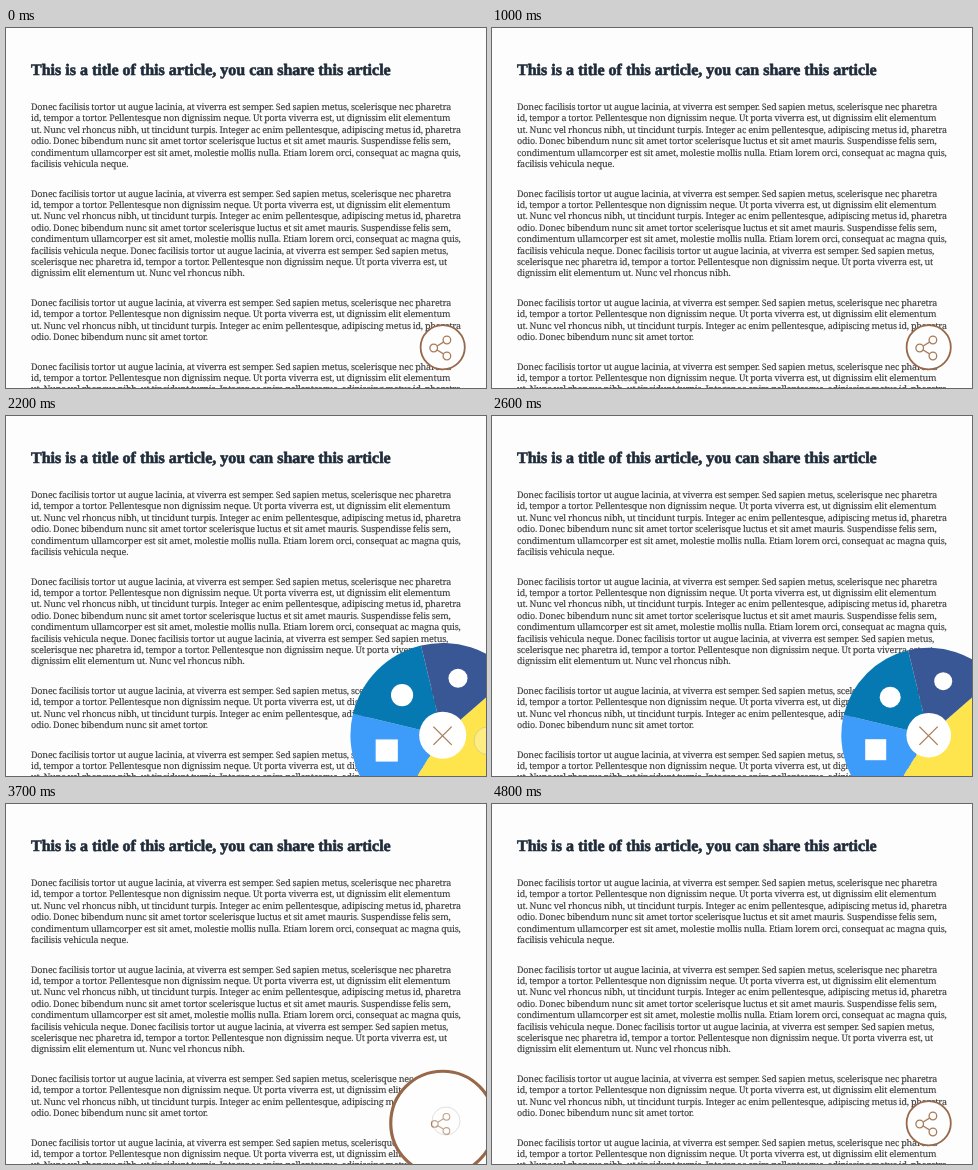
Recreate the animation shown at these times as an HTML page. Size 480 by 360 pixels, loop 4.9 s.

```html
<!DOCTYPE html>
<html lang="en">
<head>
<meta charset="utf-8">
<title>Share button</title>
<style>
html, body { margin: 0; width: 100%; height: 100%; overflow: hidden; background: #fdfdfd; }
svg { display: block; width: 480px; height: 360px; }
text { text-rendering: geometricPrecision; white-space: pre; }
.title { font: bold 16px "Liberation Serif", "Times New Roman", serif; fill: #202c3a; stroke: #202c3a; stroke-width: .6; }
.body { font: 9px "Noto Serif", serif; letter-spacing: -.217px; fill: #3c3c3c; stroke: #3c3c3c; stroke-width: .12; }
.line { fill: none; stroke: #a97c58; stroke-width: 1.3; }
</style>
</head>
<body>
<svg viewBox="0 0 480 360">
  <text class="title" x="25" y="46.5">This is a title of this article, you can share this article</text>
  <g id="copy" class="body"></g>
  <g transform="translate(436.7 319.2)">
    <circle id="disc" fill="#fefefe" stroke="#97694a"/>
    <g id="fan">
      <g id="wedges"></g>
      <g fill="#fff">
        <circle cx="-38.5" cy="-38" r="10.5"/>
        <circle cx="14.5" cy="-54" r="9"/>
        <rect x="-63.5" y="4" width="21" height="21"/>
        <circle r="22.3"/>
      </g>
    </g>
    <g id="share" class="line">
      <path d="M-5.6 -1.2L.8 -5.1M-5.6 2.8L.8 6.7"/>
      <circle cx="-9" cy=".8" r="3.8"/>
      <circle cx="4.2" cy="-7.2" r="3.8"/>
      <circle cx="4.2" cy="8.8" r="3.8"/>
    </g>
    <path id="cross" class="line" d="M-9.3 -8.6L9 9.7M9 -8.6L-9.3 9.7"/>
  </g>
  <circle id="cursor" r="14" fill="#fff" fill-opacity=".3" stroke="#999" stroke-opacity=".3"/>
</svg>
<script>
const NS = "http://www.w3.org/2000/svg";
const $ = id => document.getElementById(id);
const LOOP = 4900, STEP = 100;
const SMALL = 23, FULL = 87.4;
const OPEN = 1850, CLOSE = 3400;

function set(el, attrs) {
  for (const key in attrs) el.setAttribute(key, attrs[key]);
}
function add(parent, tag, attrs, text = "") {
  const el = document.createElementNS(NS, tag);
  set(el, attrs);
  el.textContent = text;
  parent.appendChild(el);
}

// Article
const opening = [
  "Donec facilisis tortor ut augue lacinia, at viverra est semper. Sed sapien metus, scelerisque nec pharetra",
  "id, tempor a tortor. Pellentesque non dignissim neque. Ut porta viverra est, ut dignissim elit elementum",
  "ut. Nunc vel rhoncus nibh, ut tincidunt turpis. Integer ac enim pellentesque, adipiscing metus id, pharetra"
];
const middle = [
  "odio. Donec bibendum nunc sit amet tortor scelerisque luctus et sit amet mauris. Suspendisse felis sem,",
  "condimentum ullamcorper est sit amet, molestie mollis nulla. Etiam lorem orci, consequat ac magna quis,"
];
const paragraphs = [
  [...opening, ...middle, "facilisis vehicula neque."],
  [...opening, ...middle,
    "facilisis vehicula neque. Donec facilisis tortor ut augue lacinia, at viverra est semper. Sed sapien metus,",
    "scelerisque nec pharetra id, tempor a tortor. Pellentesque non dignissim neque. Ut porta viverra est, ut",
    "dignissim elit elementum ut. Nunc vel rhoncus nibh."],
  [...opening, "odio. Donec bibendum nunc sit amet tortor."],
  opening
];
let baseline = 82;
for (const lines of paragraphs) {
  for (const line of lines) {
    add($("copy"), "text", { x: 25, y: baseline }, line);
    baseline += 11.42;
  }
  baseline += 18;
}

// Each wedge runs from its angle to the next one
const point = deg => {
  const a = deg * Math.PI / 180;
  return `${FULL * Math.cos(a)} ${FULL * Math.sin(a)}`;
};
const edges = [-41, 122, 193.5, 256.4, 319];
["#fee54e", "#3d9bfa", "#0779b2", "#3a5795"].forEach((fill, i) => add($("wedges"), "path", {
  fill, d: `M0 0L${point(edges[i])}A${FULL} ${FULL} 0 0 1 ${point(edges[i + 1])}Z`
}));

// Motion
const progress = (t, from, length) => Math.min(1, Math.max(0, (t - from) / length));
const smooth = p => p * p * (3 - 2 * p);
const mix = (a, b, p) => a + (b - a) * p;
const overshoot = p => 1 + 2.46 * (p - 1) ** 3 + 1.46 * (p - 1) ** 2;

function cursorAt(t) {
  const visit = t < 2600
    ? { arrive: 1250, leave: 1900, fromY: 350, toY: 329 }
    : { arrive: 2700, leave: 3800, fromY: 330, toY: 332 };
  const leaving = t >= visit.leave;
  const p = smooth(progress(t, leaving ? visit.leave : visit.arrive, 500));
  return {
    cx: mix(505, 440, leaving ? 1 - p : p),
    cy: leaving ? mix(317, visit.toY, p) : mix(visit.fromY, 317, p)
  };
}

function draw(t) {
  const open = t < CLOSE
    ? overshoot(progress(t, OPEN, 600))
    : 1 - smooth(progress(t, CLOSE, 580));
  const alpha = progress(t, OPEN, 200) - progress(t, CLOSE + 50, 250);
  const r = mix(SMALL, FULL, open);
  const border = 1.8 + 2.9 * Math.min(.5, open);
  set($("disc"), { r: r - border / 2, "stroke-width": border, opacity: alpha < 1 ? 1 : 0 });
  set($("fan"), { opacity: alpha, transform: `scale(${r / FULL})` });
  set($("cross"), { opacity: alpha });
  set($("share"), { opacity: 1 - alpha, transform: `scale(${1 - .25 * open})` });
  set($("cursor"), cursorAt(t));
}

const start = performance.now();
function tick() {
  const t = (performance.now() - start) % LOOP;
  draw(Math.floor(t / STEP) * STEP);
  requestAnimationFrame(tick);
}
tick();
</script>
</body>
</html>
```
